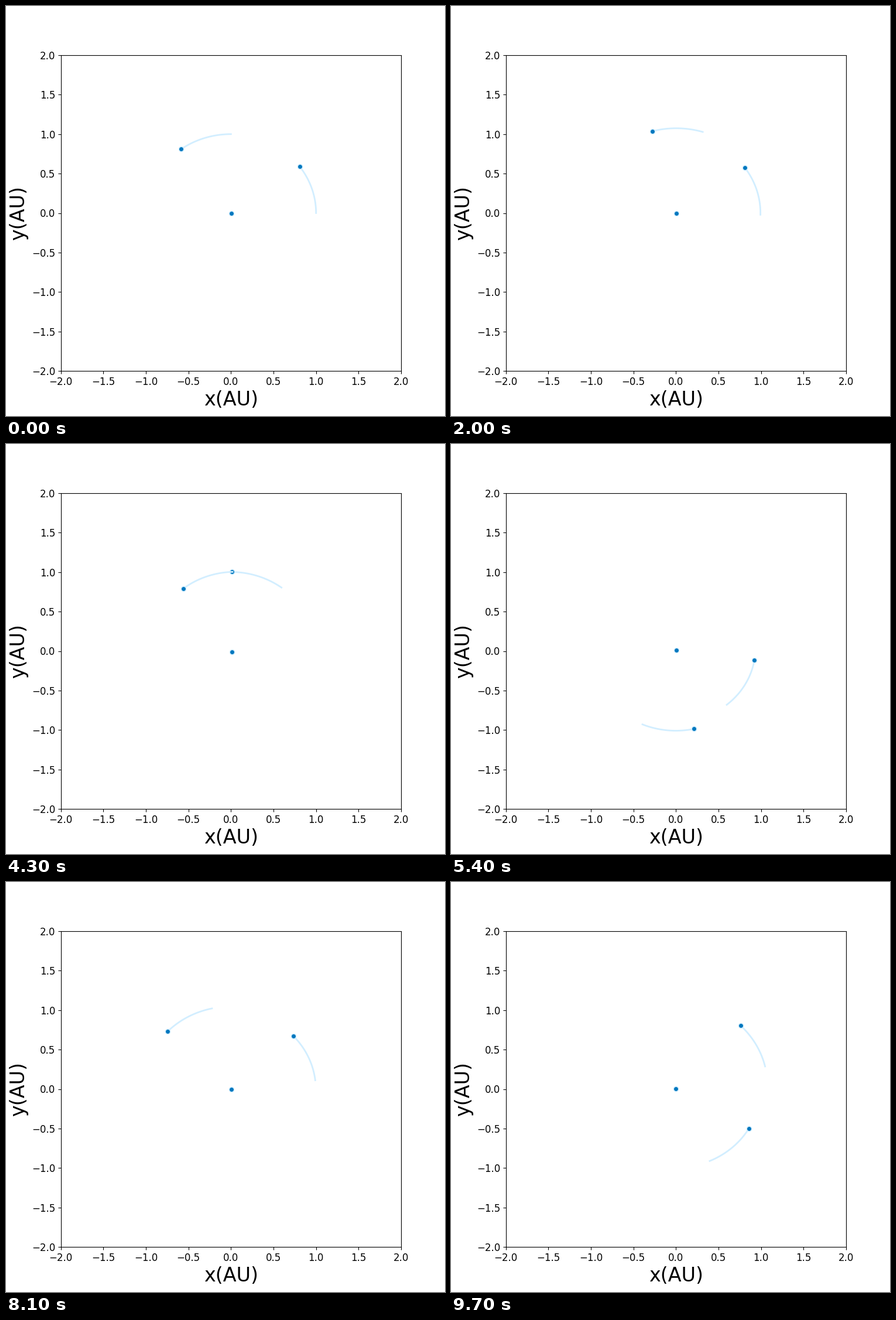
A matplotlib script that plays this animation: 750 px wide and 700 px high, repeating every 9.8 s.

```python
import numpy as np
import matplotlib.pyplot as plt
from matplotlib.animation import FuncAnimation

FRAMES, INTERVAL = 98, 100
DT = 0.001                # years
STEP, TRAIL = 50, 100     # integration steps per frame and per trail
GM = 4 * np.pi ** 2       # AU^3 / year^2
MASS = np.array([1, 0.0095, 0.00095])


def acceleration(z):
    gap = z[None, :] - z[:, None]
    return GM * (gap / (np.abs(gap) ** 3 + np.eye(len(z)))) @ MASS


def integrate(steps):
    """Velocity Verlet; positions are complex numbers x + iy."""
    z = np.array([0, 1, 1j])
    v = 2j * np.pi * z
    v[0] = -(MASS[1:] @ v[1:])    # zero total momentum
    a = acceleration(z)
    path = [z]
    for _ in range(steps):
        v = v + a * DT / 2
        z = z + v * DT
        a = acceleration(z)
        v = v + a * DT / 2
        path.append(z)
    return np.array(path)


path = integrate(TRAIL + STEP * (FRAMES - 1))

fig, ax = plt.subplots(figsize=(7.5, 7), dpi=100)
ax.set_xlim(-2, 2)
ax.set_ylim(-2, 2)
ax.tick_params(labelsize=12)
ax.set_xlabel("x(AU)", fontsize=24)
ax.set_ylabel("y(AU)", fontsize=24)
# Only the head of each trail carries a marker.
lines = [ax.plot([], [], "o-", color="#d2eeff", markerfacecolor="#0077BE",
                 lw=2, markevery=10000)[0] for _ in MASS]


def update(frame):
    start = frame * STEP
    trail = path[start:start + TRAIL + 1][::-1]
    for line, z in zip(lines, trail.T):
        line.set_data(z.real, z.imag)
    return lines


anim = FuncAnimation(fig, update, frames=FRAMES, interval=INTERVAL,
                     init_func=lambda: lines, repeat=True, repeat_delay=0)
plt.show()
```
